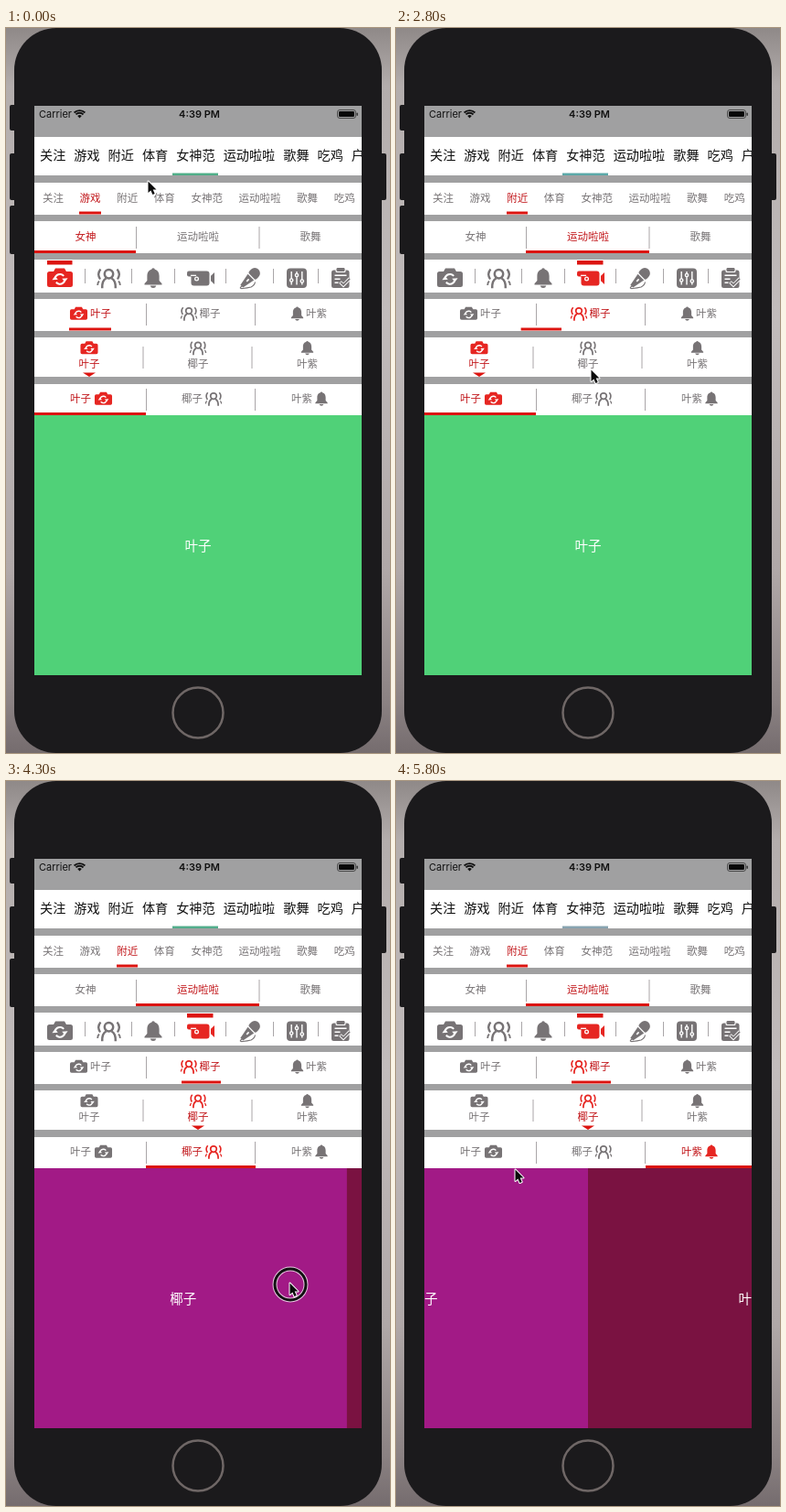
An HTML page with a canvas that plays this animation: 420x792 px, repeating every 5.9 s.

```html
<!DOCTYPE html>
<html lang="zh">
<head>
<meta charset="utf-8">
<title>Tab bars</title>
<style>
html, body { margin: 0; width: 100%; height: 100%; overflow: hidden; background: #b5adad; }
canvas { display: block; width: 420px; height: 792px; }
</style>
</head>
<body>
<canvas id="stage"></canvas>
<script>
const W = 420, H = 792, LOOP = 5900, STEP = 100;
const canvas = document.getElementById('stage');
const dpr = window.devicePixelRatio || 1;
canvas.width = W * dpr;
canvas.height = H * dpr;
const c = canvas.getContext('2d');

const CJK = '"Noto Sans CJK SC", "Noto Sans CJK", sans-serif';
const LATIN = 'Inter, Roboto, sans-serif';
const GREY = '#777375', RED = '#e62622', DARK_RED = '#c2181c', BAR = '#dc1410';
const PHONE = '#1b1a1c', CHROME = '#a0a0a1';
const LEFT = 31, RIGHT = 389, PAGE_W = RIGHT - LEFT;

const lerp = (a, b, p) => a + (b - a) * p;
const ease = p => p * p * (3 - 2 * p);
const progress = (t, start, len) => ease(Math.min(1, Math.max(0, (t - start) / len)));

function rect(x, y, w, h, color) {
  c.fillStyle = color;
  c.fillRect(x, y, w, h);
}

function box(x, y, w, h, r, color) {
  c.fillStyle = color;
  c.beginPath();
  c.roundRect(x, y, w, h, r);
  c.fill();
}

function disc(x, y, r, color) {
  c.fillStyle = color;
  c.beginPath();
  c.arc(x, y, r, 0, 7);
  c.fill();
}

function arc(x, y, r, a, b, width, color) {
  c.strokeStyle = color;
  c.lineWidth = width;
  c.beginPath();
  c.arc(x, y, r, a, b);
  c.stroke();
}

function path(d, color, width) {
  const p = new Path2D(d);
  if (width) {
    c.strokeStyle = color;
    c.lineWidth = width;
    c.stroke(p);
  } else {
    c.fillStyle = color;
    c.fill(p);
  }
}

// y is the optical middle of the glyphs
function text(s, x, y, size, color, align = 'center') {
  c.font = `${size}px ${CJK}`;
  c.textAlign = align;
  c.fillStyle = color;
  c.fillText(s, x, y + size * 0.38);
}

const icons = {
  camera(k) {
    path('M-7 -7L-5 -10.5H5L7 -7H11.5Q14 -7 14 -4.5V7.5Q14 10 11.5 10H-11.5Q-14 10 -14 7.5V-4.5Q-14 -7 -11.5 -7Z', k);
    arc(0, 1.3, 5.4, 3.3, 5.6, 2, '#fff');
    arc(0, 1.3, 5.4, 0.15, 2.45, 2, '#fff');
    path('M-8.6 2.3L-5.4 -2L-2.2 1.8ZM8.6 0.3L5.4 4.6L2.2 0.8Z', '#fff');
  },
  person(k) {
    arc(0, -4.2, 4.7, 0, 7, 2.5, k);
    path('M-7.3 11.2Q-7.6 2.8 -3 0.5M7.3 11.2Q7.6 2.8 3 0.5', k, 2.5);
    path('M-9 -9.5Q-13.3 -4.5 -9.5 1.5M9 -9.5Q13.3 -4.5 9.5 1.5', k, 2.3);
    path('M-10.5 3.5Q-12.3 5 -12.3 8M10.5 3.5Q12.3 5 12.3 8', k, 1.8);
  },
  bell(k) {
    disc(0, -9, 1.8, k);
    path('M0 -9.5C5 -9.5 6.6 -5.5 6.6 -2V3L9.5 6.2V7.5H-9.5V6.2L-6.6 3V-2C-6.6 -5.5 -5 -9.5 0 -9.5Z', k);
    path('M-3.3 8.5H3.3Q2.6 11 0 11Q-2.6 11 -3.3 8.5Z', k);
  },
  video(k) {
    box(-10.5, -7.5, 20, 16, 3, k);
    box(-15, -7.5, 8, 6, 2, k);
    path('M11 -2.2L15 -6V7L11 3.2Z', k);
    rect(-11, -3.3, 6, 1.3, '#fff');
    disc(-4.5, 1, 2.5, '#fff');
    disc(-4.5, 1, 1.2, k);
  },
  mic(k) {
    c.save();
    c.rotate(Math.PI / 4);
    box(-5.8, -13, 11.6, 10.5, [5.8, 5.8, 2, 2], k);
    path('M-4.7 -1.2H4.7L2 13H-2Z', k);
    rect(-0.8, 2, 1.6, 3.4, '#fff');
    c.restore();
    path('M-9 9Q-13 12 -8 11.5T1 10Q5 8 5.5 4.5', k, 1.2);
  },
  sliders(k) {
    box(-11, -10.5, 22, 21.5, 4, k);
    [[-5.8, 2.5], [0, -3], [5.8, 3.5]].forEach(([x, y]) => {
      rect(x - 0.7, -7, 1.4, 14.5, '#fff');
      disc(x, y, 2.3, '#fff');
      disc(x, y, 0.9, k);
    });
  },
  clipboard(k) {
    box(-10, -8.5, 19.5, 19.5, 2.5, k);
    box(-5.5, -11, 11, 5, 1.5, '#fff');
    box(-4.5, -11, 9, 4, 1.2, k);
    rect(-6.5, -3.5, 13, 1.5, '#fff');
    rect(-6.5, 0.5, 6, 1.5, '#fff');
    rect(-6.5, 4.5, 4, 1.5, '#fff');
    path('M-0.5 4.5L3 8L10 0.8', '#fff', 3.6);
    path('M0 4.8L3 7.7L10 0.8', k, 1.8);
  }
};

function icon(name, x, y, scale, color) {
  c.save();
  c.translate(x, y);
  c.scale(scale, scale);
  icons[name](color);
  c.restore();
}

function lines(xs, y, h) {
  xs.forEach(x => rect(x - 0.5, y, 1, h, '#aaa6a8'));
}

// Indicator sliding from span a to span b
function slide(a, b, p, y, h = 3) {
  const x = lerp(a[0], b[0], p);
  rect(x, y, lerp(a[1], b[1], p) - x, h, BAR);
}

function backdrop() {
  const g = c.createLinearGradient(0, 0, 0, H);
  g.addColorStop(0, '#8f8988');
  g.addColorStop(0.08, '#b3adac');
  g.addColorStop(0.4, '#c2bcbc');
  g.addColorStop(0.75, '#b0a8a8');
  g.addColorStop(0.93, '#8b8283');
  g.addColorStop(1, '#756c6e');
  rect(0, 0, W, H, g);
  [84, 137, 194].forEach((y, i) => box(4, y, 8, [28, 51, 53][i], 2, PHONE));
  box(408, 137, 8, 51, 2, PHONE);
  box(9, 0, 402, 792, 46, PHONE);
  arc(210, 748, 27.5, 0, 7, 2.5, '#6f6766');
}

function statusBar() {
  c.fillStyle = '#111';
  c.textAlign = 'left';
  c.font = `11px ${LATIN}`;
  c.fillText('Carrier', 36, 98);
  c.textAlign = 'center';
  c.font = `600 11px ${LATIN}`;
  c.fillText('4:39 PM', 211.5, 98);
  [3.6, 6.5, 9.2].forEach((r, i) => {
    if (i) arc(80.5, 98.5, r - 0.8, -2.35, -0.79, 1.9, '#111');
    else path('M80.5 98.5L78.2 96Q80.5 94.2 82.8 96Z', '#111');
  });
  c.strokeStyle = '#333';
  c.lineWidth = 0.8;
  c.beginPath();
  c.roundRect(362.5, 89.5, 20, 9, 2.5);
  c.stroke();
  box(364, 91, 17, 6, 1.2, '#080808');
  box(383.5, 92.5, 1.4, 3.4, 0.7, '#333');
}

const labels = ['关注', '游戏', '附近', '体育', '女神范', '运动啦啦', '歌舞', '吃鸡', '户外'];

function labelRow(x, y, size, gap, color) {
  labels.forEach((s, i) => {
    text(s, x, y, size, color(i), 'left');
    x += s.length * size + gap;
  });
}

const tint = [[0, '#50ae88'], [600, '#5ba8a8'], [3500, '#52ad8c'], [4400, '#88a3b0']];

function rows(t) {
  const pick = (on, color = DARK_RED) => on ? color : GREY;
  [[119, 42], [169, 35], [211, 35], [253, 36], [296, 35], [338, 43], [389, 34]]
    .forEach(([y, h]) => rect(LEFT, y, PAGE_W, h, '#fff'));

  labelRow(37, 139, 14.15, 9, () => '#111');
  rect(182, 158.5, 50, 2.5, tint.filter(k => k[0] <= t).pop()[1]);

  const second = t >= 1000 ? 2 : 1;
  labelRow(40, 185.5, 11.5, 17.6, i => pick(i === second));
  slide([80, 104], [121, 144], progress(t, 1000, 300), 200.5);

  const third = t >= 1400 ? 1 : 0;
  ['女神', '运动啦啦', '歌舞'].forEach((s, i) =>
    text(s, [87, 210, 333][i], 228, 11.5, pick(i === third)));
  lines([142.5, 277], 217, 24);
  slide([31, 142], [142, 277], progress(t, 1400, 300), 243);

  const fourth = t >= 2100 ? 3 : 0;
  Object.keys(icons).forEach((name, i) =>
    icon(name, [59, 112.5, 161, 213, 267, 318, 366][i], 273, 1, pick(i === fourth, RED)));
  lines([86.5, 137.5, 184.5, 240.5, 292.5, 341.5], 263, 16);
  slide([45, 72.5], [198, 226.5], progress(t, 2100, 300), 254, 4.5);

  const fifth = t >= 2640 ? 1 : 0;
  const sixth = t >= 3150 ? 1 : 0;
  const seventh = t >= 4540 ? 2 : t >= 3700 ? 1 : 0;
  const names = ['叶子', '椰子', '叶紫'];
  ['camera', 'person', 'bell'].forEach((name, i) => {
    const scale = [0.68, 0.7, 0.7][i];
    const mid = [91, 210, 329.5][i];
    icon(name, [79.5, 200, 318.5][i], 312, scale, pick(i === fifth, RED));
    text(names[i], [92, 211.5, 328][i], 312, 11.5, pick(i === fifth), 'left');
    icon(name, mid, 349.5, scale, pick(i === sixth, RED));
    text(names[i], mid, 366.5, 11.5, pick(i === sixth));
    text(names[i], [70, 192, 312][i], 405, 11.5, pick(i === seventh), 'left');
    icon(name, [106.5, 227, 345][i], 405, scale, pick(i === seventh, RED));
  });
  lines([153.5, 272.5], 301, 24);
  slide([69, 115], [192, 235], progress(t, 2640, 300), 327.5);

  lines([150, 269], 348, 24);
  const tip = lerp(91, 210, progress(t, 3150, 300));
  path(`M${tip - 7} 376.5H${tip + 7}L${tip} 381Z`, BAR);

  lines([153.5, 272.5], 394, 24);
  if (seventh < 2) slide([31, 153], [153, 273], progress(t, 3700, 300), 420);
  else slide([153, 273], [273, 389], progress(t, 4540, 300), 420);
}

function pages(t) {
  const pos = progress(t, 3708, 400) + progress(t, 4250, 390) - progress(t, 5500, 600);
  [['叶子', '#50d178'], ['椰子', '#a21a86'], ['叶紫', '#7a1241']].forEach(([s, color], i) => {
    const x = LEFT + (i - pos) * PAGE_W;
    rect(x, 423, PAGE_W + 0.5, 284, color);
    text(s, x + PAGE_W / 2, 565.5, 14.6, '#fff');
  });
}

// time, x, y of the pointer tip
const trail = [
  [0, 155, 167], [500, 140, 180], [900, 132, 190], [1100, 132, 189],
  [1350, 212, 230], [1500, 212, 231], [1800, 198, 296], [2000, 210, 275],
  [2150, 211, 275], [2450, 213, 312], [2600, 213, 313], [2800, 213, 373],
  [3250, 213, 370], [3500, 213, 404], [3750, 214, 406], [4000, 242, 517],
  [4200, 310, 548], [4300, 310, 548], [4500, 237, 549], [4900, 237, 549],
  [5400, 205, 408], [5500, 200, 407], [5800, 130, 424], [5900, 130, 424]
];

function pointer(t) {
  const i = trail.findIndex(k => k[0] > t);
  const a = trail[i - 1], b = trail[i];
  const p = ease((t - a[0]) / (b[0] - a[0]));
  const x = lerp(a[1], b[1], p), y = lerp(a[2], b[2], p);
  if (t >= 4250 && t < 4800) {
    arc(x + 1, y + 2, 17, 0, 7, 5, 'rgba(255,255,255,.75)');
    arc(x + 1, y + 2, 17, 0, 7, 3, '#111');
  }
  c.save();
  c.translate(x, y);
  c.lineJoin = 'round';
  const arrow = 'M0.5 0.5V13L3.4 10.4L5.4 15L7.7 14L5.7 9.6H9.5Z';
  path(arrow, '#fff', 2);
  path(arrow, '#0a0a0a');
  c.restore();
}

function draw(t) {
  c.setTransform(dpr, 0, 0, dpr, 0, 0);
  backdrop();
  c.save();
  c.beginPath();
  c.rect(LEFT, 85, PAGE_W, 622);
  c.clip();
  rect(LEFT, 85, PAGE_W, 622, CHROME);
  statusBar();
  rows(t);
  pages(t);
  c.restore();
  pointer(t);
}

const start = performance.now();
function tick() {
  const t = (performance.now() - start) % LOOP;
  draw(Math.floor(t / STEP) * STEP);
  requestAnimationFrame(tick);
}
tick();
</script>
</body>
</html>
```
